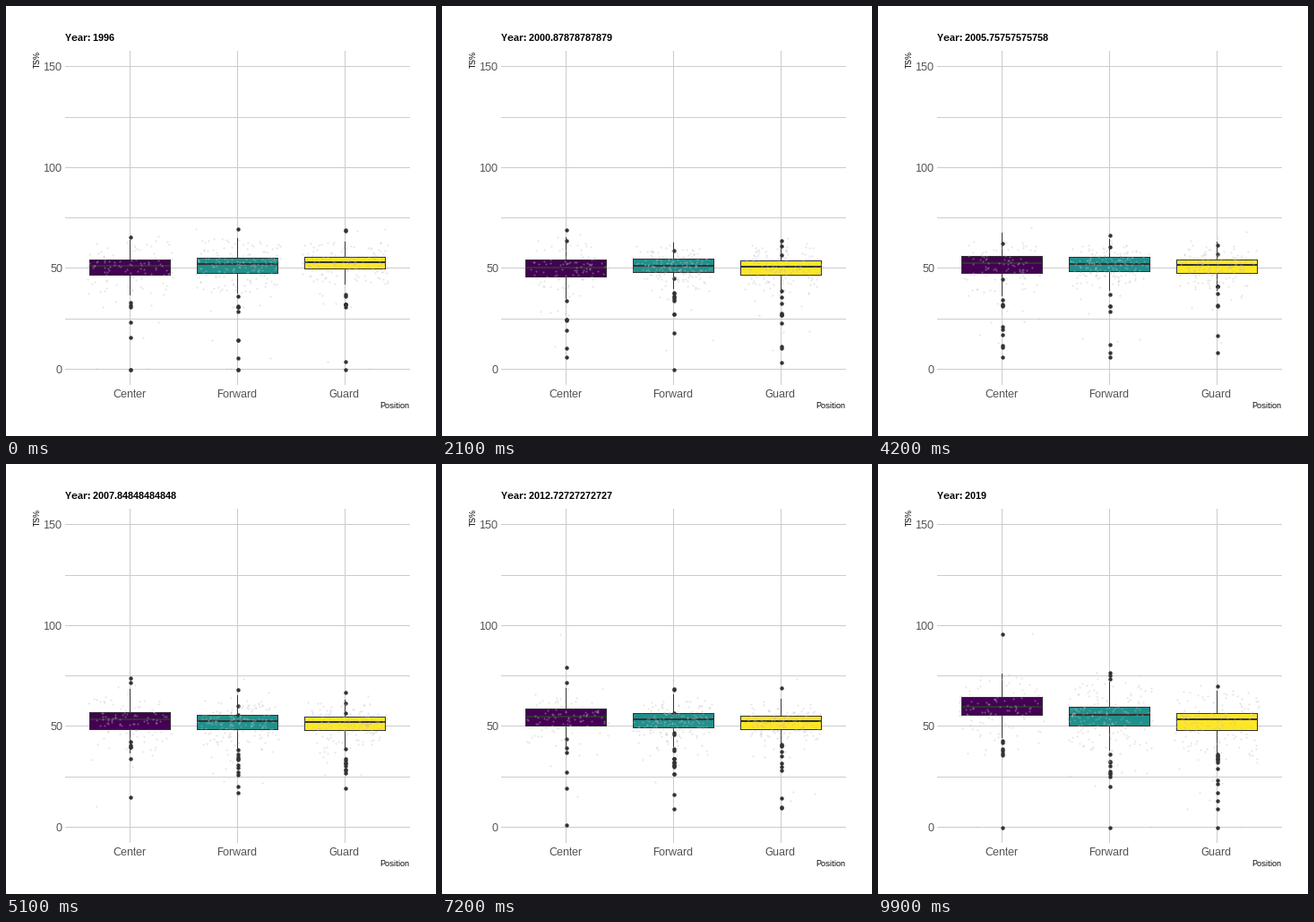
A matplotlib script for the animation above (10 s loop, 480 by 480 pixels).

```python
import numpy as np
import matplotlib.pyplot as plt
from matplotlib.animation import FuncAnimation
from matplotlib.patches import Rectangle

SIZE, DPI = 480, 72                 # at 72 dpi one point is one pixel
FRAMES, SEASONS = 100, 24
INK, GRID, GREY = "#333333", "#cccccc", "#4d4d4d"

# Season data is reached on these frames and tweened linearly in between.
knots = np.round(np.arange(SEASONS) * (FRAMES - 1) / (SEASONS - 1))
TREND = [0, 5, 14, 18, 23]          # seasons where the quartile trends bend

rng = np.random.default_rng(1996)
plt.rcParams.update({"font.family": "Liberation Sans",
                     "text.hinting": "native", "text.hinting_factor": 1})

fig = plt.figure(figsize=(SIZE / DPI, SIZE / DPI), dpi=DPI, facecolor="white")
ax = fig.add_axes([0, 0, 1, 1])
ax.set(xlim=(0, SIZE), ylim=(SIZE, 0))
ax.axis("off")


def ypix(value):
    return 404.875 - 2.25 * np.asarray(value, float)


def line(x, y, color=INK, width=1, z=1):
    return ax.plot(x, y, color=color, lw=width, zorder=z, snap=True,
                   antialiased=False, solid_capstyle="projecting")[0]


def label(x, y, text, size, color="black", **kw):
    return ax.text(x, y, text, fontsize=size, color=color, va="baseline", **kw)


def points(color, size, z, **kw):
    return ax.scatter([], [], s=size ** 2, color=color, linewidths=0,
                      zorder=z, **kw)


def stretch(values, n):
    return values[np.arange(n) * len(values) // n]


class Group:
    """One box with its whiskers, outliers and jittered observations."""

    def __init__(self, x, color, count, tail, quartiles):
        self.x = x + 0.5
        self.stats = self.trend(quartiles)
        self.outliers = [self.stray(s, tail) for s in self.stats]
        self.obs = [self.observe(s, o, count)
                    for s, o in zip(self.stats, self.outliers)]
        self.dx = rng.uniform(-48, 48, (SEASONS, count))

        self.whisker = line([x, x], [0, 0], z=2)
        self.box = ax.add_patch(Rectangle(
            (x - 45, 0), 90, 1, fc=color, ec=INK, lw=1, zorder=3,
            snap=True, antialiased=False))
        self.median = line([x - 44, x + 45], [0, 0], width=2, z=4)
        self.far = points(INK, 4.4, 5, antialiased=False)
        self.dots = points("#bebebe", 2.1, 6, alpha=0.4)

    @staticmethod
    def trend(quartiles):
        q1, med, q3 = (np.interp(np.arange(SEASONS), TREND, q) for q in quartiles)
        reach = 1.3 * (q3 - q1)
        return np.column_stack([q1 - reach, q1, med, q3, q3 + reach])

    @staticmethod
    def stray(stats, tail):
        low = stats[0] - 0.5 - rng.exponential(10, rng.poisson(tail))
        high = stats[-1] + 0.5 + rng.exponential(5, rng.integers(1, 4))
        zero = [0] * int(rng.random() < 0.65)
        return rng.permutation(np.concatenate([np.maximum(low, 0), high, zero]))

    @staticmethod
    def observe(stats, outliers, count):
        n = count - len(outliers)
        body = np.interp((np.arange(n) + 0.5) / n,
                         [0, 0.25, 0.5, 0.75, 1], stats)
        return rng.permutation(np.concatenate([body, outliers]))

    def draw(self, a, b, w):
        def mix(p, q):
            return p + (q - p) * w

        lo, q1, med, q3, hi = ypix(mix(self.stats[a], self.stats[b]))
        self.whisker.set_ydata([lo, hi])
        self.box.set_y(q3)
        self.box.set_height(q1 - q3)
        self.median.set_ydata([med, med])

        old, new = self.outliers[a], self.outliers[b]
        n = max(len(old), len(new))
        far = np.round(ypix(mix(stretch(old, n), stretch(new, n)))) + 0.5
        self.far.set_offsets(np.column_stack([np.full(n, self.x), far]))
        self.dots.set_offsets(np.column_stack([
            self.x + mix(self.dx[a], self.dx[b]),
            ypix(mix(self.obs[a], self.obs[b])) + 0.5]))


for v in range(0, 151, 25):
    y = np.round(ypix(v))
    line([66, 450], [y, y], GRID)
    if v % 50 == 0:
        label(63, y + 5, str(v), 12, GREY, ha="right")
for x, name in ((138, "Center"), (258, "Forward"), (378, "Guard")):
    line([x, x], [50, 422], GRID)
    label(x - 0.4, 437, name, 12, GREY, ha="center")

title = label(66, 39, "", 11, weight="bold")
label(450, 449, "Position", 9, ha="right")
label(38, 50, "TS%", 9, ha="right", rotation=90, rotation_mode="anchor")

groups = [
    Group(138, "#440154", 105, tail=5,
          quartiles=[[46.7, 45.8, 49.0, 50.8, 55.7],
                     [51.1, 50.3, 54.0, 55.1, 59.3],
                     [54.2, 54.3, 57.8, 58.7, 64.5]]),
    Group(258, "#21908c", 180, tail=10,
          quartiles=[[47.6, 48.1, 48.4, 49.6, 50.2],
                     [52.1, 51.2, 52.6, 53.5, 55.6],
                     [55.1, 54.4, 56.1, 56.4, 59.6]]),
    Group(378, "#fde725", 165, tail=8,
          quartiles=[[49.8, 46.7, 48.4, 48.6, 48.1],
                     [53.0, 50.4, 52.2, 52.2, 53.5],
                     [55.6, 53.8, 54.8, 55.1, 56.6]]),
]


def update(i):
    title.set_text(f"Year: {1996 + 23 * i / (FRAMES - 1):.15g}")
    season = np.interp(i, knots, np.arange(SEASONS))
    a = int(season)
    for group in groups:
        group.draw(a, min(a + 1, SEASONS - 1), season - a)
    return []


anim = FuncAnimation(fig, update, frames=FRAMES, interval=100,
                     init_func=lambda: [], repeat=True, repeat_delay=0)
plt.show()
```
